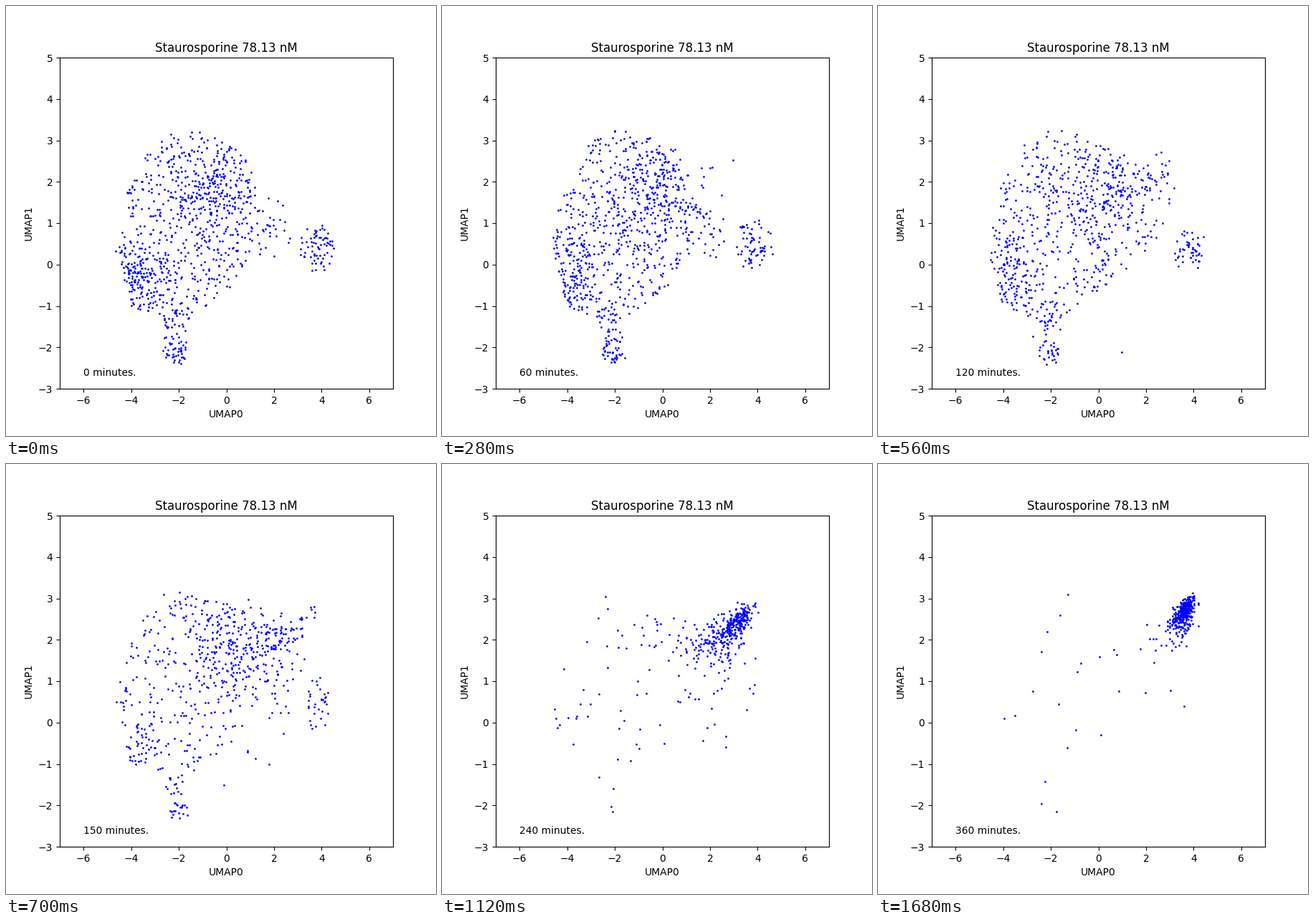
Animation of 600x600 px, one loop 1.82 s. Source, as a matplotlib script:

```python
import numpy as np
import matplotlib.pyplot as plt
from matplotlib.animation import FuncAnimation
from matplotlib.path import Path

FRAMES, INTERVAL, STEP = 13, 140, 30  # STEP: minutes per frame
CELLS, DYING = 960, 400
ONSET, WIDTH, PACE = 2.45, 0.5, 1.1   # hours

# Outline of the healthy cells, and the path that dying cells follow
BODY = Path([(-4.7, .4), (-4.2, 1.8), (-3, 3), (-2, 3.25), (-1, 3.2),
             (.9, 2.7), (1.5, 1.2), (.5, -.4), (-2, -1.5), (-4, -1)])
ROUTE = np.array([(0, 2.5), (1.6, 1.5), (3.77, 2.87)])


def even(rng, n):
    """Scatter n points evenly over the body."""
    lo, hi = BODY.vertices.min(0), BODY.vertices.max(0)
    pts = rng.uniform(lo, hi, (4 * n + 50, 2))
    return pts[BODY.contains_points(pts)][:n]


def clump(rng, n, centre, spread, within=None):
    """Scatter n points in a trimmed normal cloud."""
    z = rng.normal(size=(5 * n + 50, 2))
    pts = centre + z[np.hypot(*z.T) < 2.2] * spread
    if within:
        pts = pts[within.contains_points(pts)]
    return pts[:n]


def healthy(rng, hours):
    alive = .02 + .98 / (1 + np.exp((hours - ONSET) / WIDTH))

    def share(part):
        return round(CELLS * alive * part)

    return np.vstack([
        even(rng, share(.6)),
        clump(rng, share(.14), (-.6, 1.9), (.9, .65), BODY),
        clump(rng, share(.09), (-3.7, -.35), (.5, .5), BODY),
        clump(rng, share(.07), (3.85, .45), (.38, .3)),    # island
        clump(rng, share(.03), (1.9, .8), (.45, .4)),      # bridge
        clump(rng, share(.03), (-2.2, -1.5), (.35, .3)),   # neck
        clump(rng, share(.04), (-2.1, -2.1), (.3, .15)),   # tail
    ])


def dying(rng, hours):
    """Cells leave the body at random times and slow down along the route."""
    age = hours - rng.logistic(ONSET, WIDTH, DYING)
    s = 1 - np.exp(-age[age > 0] / PACE)
    a, b, c = ROUTE[:, :, None]
    x, y = (1 - s) ** 2 * a + 2 * s * (1 - s) * b + s ** 2 * c
    dx = rng.normal(size=s.size) * (.17 + .6 * (1 - s))
    dy = rng.normal(size=s.size) * (.1 + .28 * (1 - s))
    sag = .5 * (1.15 - s) * rng.exponential(size=s.size) ** 1.5
    return np.column_stack([x + dx, y + dy + .4 * s * dx - sag])


def cloud(i):
    rng = np.random.default_rng(40 + i)
    hours = i * STEP / 60
    return np.vstack([healthy(rng, hours), dying(rng, hours)])


clouds = [cloud(i) for i in range(FRAMES)]

fig, ax = plt.subplots(figsize=(6, 6), dpi=100)
ax.set(xlim=(-7, 7), ylim=(-3, 5), xlabel="UMAP0", ylabel="UMAP1",
       title="Staurosporine 78.13 nM")
dots, = ax.plot([], [], "bo", markersize=1)
label = ax.text(-6, -2.685, "")


def update(i):
    dots.set_data(*clouds[i].T)
    label.set_text(f"{i * STEP} minutes.")
    return dots, label


anim = FuncAnimation(fig, update, frames=FRAMES, interval=INTERVAL,
                     repeat=True, repeat_delay=0)
plt.show()
```
